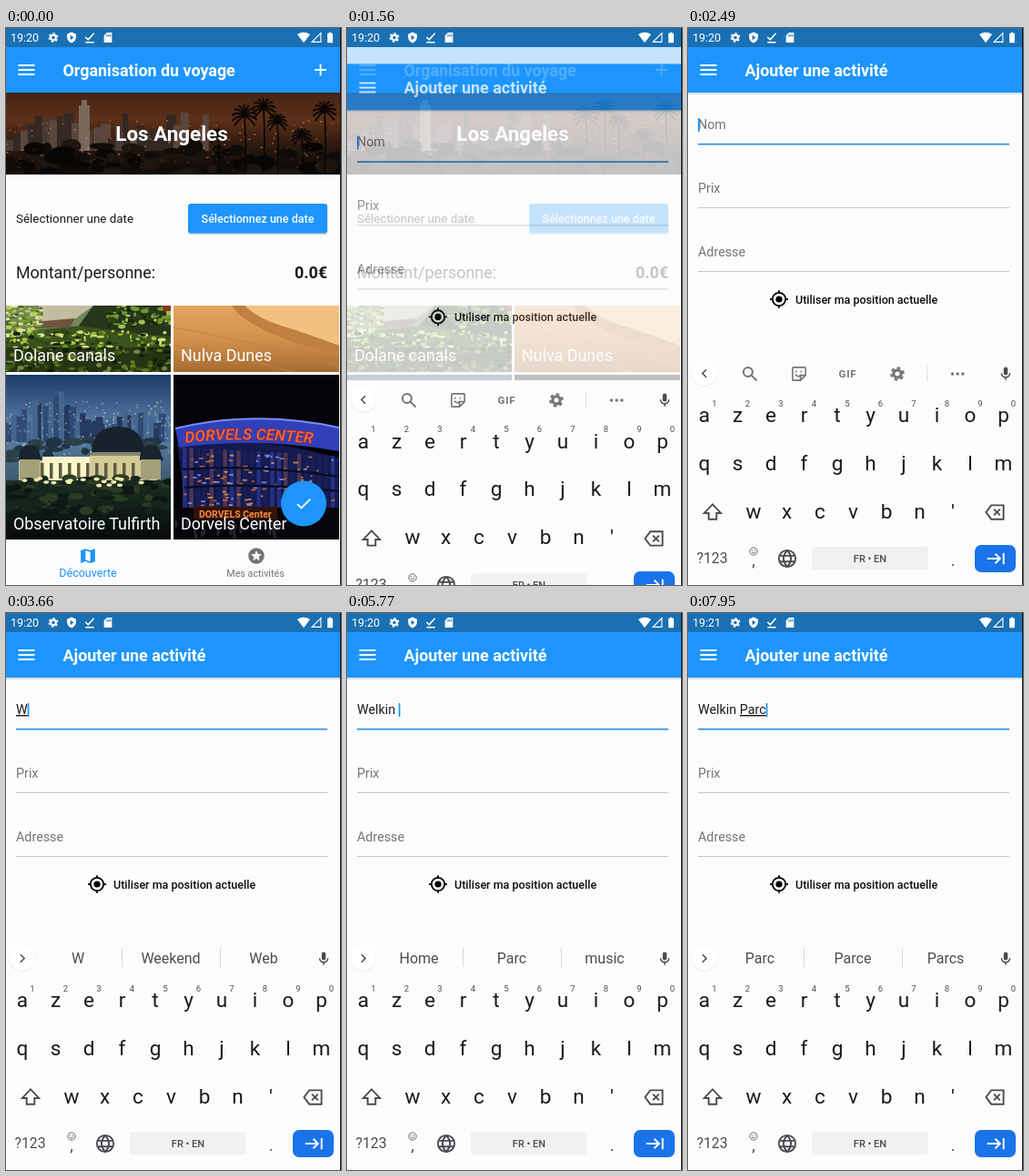
Animation of 368 by 612 pixels, one loop 8 s. Source, as an HTML page:

```html
<!DOCTYPE html>
<html lang="fr">
<head>
<meta charset="utf-8">
<title>Organisation du voyage</title>
<style>
html, body { margin: 0; width: 100%; height: 100%; overflow: hidden; background: #fcfcfe; }
svg { display: block; }
text { font-family: Roboto, "Liberation Sans", sans-serif; white-space: pre; }
</style>
</head>
<body>
<svg id="stage" width="368" height="612" viewBox="0 0 368 612"></svg>
<script>
const BLUE = '#1d95fc', PAGE = '#fcfcfe', INK = '#1a1a1a', GREY = '#747474', KEY = '#4a4d50', RULE = '#c6c6be';

// ---------- drawing helpers ----------
let seed = 7;
const rnd = (a, b) => a + (b - a) * ((seed = seed * 16807 % 2147483647) / 2147483647);
const pick = (...list) => list[rnd(0, list.length) | 0];
const times = (n, fn) => Array.from({ length: n }, (_, i) => fn(i)).join('');
const rect = (x, y, w, h, fill, more = '') =>
  `<rect x="${x}" y="${y}" width="${w}" height="${h}" fill="${fill}" ${more}/>`;
const oval = (x, y, rx, ry, fill, more = '') =>
  `<ellipse cx="${x}" cy="${y}" rx="${rx}" ry="${ry}" fill="${fill}" ${more}/>`;
const path = (d, fill, more = '') => `<path d="${d}" fill="${fill}" fill-rule="evenodd" ${more}/>`;
const line = (d, color, w = 1, more = '') => path(d, 'none', `stroke="${color}" stroke-width="${w}" ${more}`);
const text = (x, y, size, s, fill = INK, more = '') =>
  `<text x="${x}" y="${y}" font-size="${size}" fill="${fill}" ${more}>${s}</text>`;
const MID = ' text-anchor="middle"', MEDIUM = ' font-weight="500"', BOLD = ' font-weight="700"';
const ring = (x, y, r) => `M${x - r} ${y}a${r} ${r} 0 1 0 ${2 * r} 0a${r} ${r} 0 1 0 ${-2 * r} 0`;
const at = (x, y, size, body) =>
  `<g transform="translate(${x - size / 2} ${y - size / 2}) scale(${size / 24})">${body}</g>`;
const solid = (x, y, size, color, d) => at(x, y, size, path(d, color));
const outline = (x, y, size, color, d, w = 2, more = '') => at(x, y, size, line(d, color, w, more));
const gear = (x, y, size, color) => at(x, y, size,
  line(ring(12, 12, 5.3), color, 4) + line(ring(12, 12, 8.4), color, 3, 'stroke-dasharray="4.6 4.2"'));
const fade = (id, ...stops) => `<linearGradient id="${id}" x2="0" y2="1">` +
  stops.map((c, i) => `<stop offset="${i / (stops.length - 1)}" stop-color="${c}"/>`).join('') + '</linearGradient>';
const photo = (x, y, w, h, body) => `<svg x="${x}" y="${y}" width="${w}" height="${h}">${body}</svg>`;

const MENU = 'M3 18h18v-2H3zM3 13h18v-2H3zM3 6v2h18V6z';
const PLUS = 'M19 13h-6v6h-2v-6H5v-2h6V5h2v6h6z';
const CHECK = 'M9 16.2L4.8 12l-1.4 1.4L9 19 21 7l-1.4-1.4z';
const MAP = 'M20.5 3L15 5.1 9 3 3 5v16l6-2.1 6 2.1 6-2V3zM15 19l-6-2.1V5l6 2.1z';
const STAR = ring(12, 12, 10) + 'M16.2 18L12 15.5 7.8 18l1.1-4.8L5.2 10l4.9-.4L12 5l1.9 4.5 4.9.4-3.7 3.3z';
const MIC = 'M12 14q3 0 3-3V5q0-3-3-3T9 5v6q0 3 3 3zM17 11q0 5-5 5t-5-5H5q0 6 6 7v3h2v-3q6-1 6-7z';
const GLOBE = ring(12, 12, 10) + 'M12 2Q3 12 12 22Q21 12 12 2M3 8.5h18M3 15.5h18';
const BACK = 'M15 6l-6 6 6 6', FORTH = 'M9 6l6 6-6 6';

// ---------- photos ----------
function palm(x, y, r, h) {
  const c = '#0b0805';
  return line(`M${x} ${y}q2 ${h / 2} 0 ${h}`, c, 1.8) + times(11, i => {
    const a = i / 10 * 4.4 - 3.8, dx = Math.cos(a) * r, dy = Math.sin(a) * r;
    return line(`M${x} ${y}q${dx * .6} ${dy * .8 - 2} ${dx} ${dy + 3}`, c, 2);
  });
}

function cityPhoto() {
  return rect(0, 0, 367, 90, 'url(#dusk)') +
    times(28, i => {
      const h = rnd(12, 44);
      return rect(i * 8, 64 - h, rnd(6, 13), h, pick('#4a3a36', '#332824', '#5a463c'));
    }) +
    rect(80, 14, 12, 50, '#7a685c') + rect(83, 8, 6, 8, '#7a685c') +
    times(130, () => rect(rnd(0, 360), rnd(30, 72), 1.6, 1.6, pick('#c07a3a', '#8a5a38', '#d8b080'), 'opacity=".6"')) +
    times(80, () => oval(rnd(0, 367), rnd(58, 92), rnd(5, 15), rnd(3, 9), pick('#100c09', '#1c1510', '#090706'))) +
    times(40, () => rect(rnd(0, 360), rnd(60, 86), 1.6, 1.2, '#a0602c', 'opacity=".5"')) +
    palm(262, 25, 14, 65) + palm(283, 17, 13, 72) + palm(298, 32, 11, 60) + palm(350, 20, 13, 70) +
    palm(325, 48, 11, 45) + palm(233, 47, 9, 40);
}

function canalPhoto() {
  const leaves = (n, x0, x1, y0, y1, ...colors) =>
    times(n, () => oval(rnd(x0, x1), rnd(y0, y1), rnd(1, 4.5), rnd(.8, 2.6), pick(...colors)));
  return rect(0, 0, 181, 73, '#3c5220') +
    path('M0 0H110L84 22 0 30z', '#74865c') + path('M36 0H96L74 16 40 20z', '#c3bda0') +
    path('M30 18L76 14 70 24 26 25z', '#6e5440') +
    path('M96 0H181V34Q130 30 80 22z', '#26361a') +
    leaves(110, 0, 40, 0, 34, '#b4cc5a', '#456a20', '#dde6a0', '#7ca034') +
    leaves(80, 112, 181, 0, 24, '#2a4414', '#6f9430', '#19290c', '#a3bd58') +
    leaves(280, 0, 181, 28, 74, '#a8c43e', '#2c4612', '#d3de7c', '#6a9024', '#16260a') +
    rect(172, 0, 9, 6, '#8c3422') + rect(0, 46, 181, 27, '#0c1606', 'opacity=".45"');
}

function dunePhoto() {
  return rect(0, 0, 182, 73, 'url(#sand)') +
    path('M78 0Q92 14 118 22T182 44V0z', '#f2c182') +
    path('M78 0Q92 14 118 22T182 44V54Q130 42 100 27T64 0z', '#bf8040') +
    line('M0 24Q70 36 182 66M0 44Q60 52 130 73', '#c08244', 2, 'opacity=".5"');
}

function domePhoto() {
  return rect(0, 0, 181, 181, 'url(#mist)') +
    times(32, i => {
      const h = rnd(6, i > 2 && i < 14 ? 44 : 20);
      return rect(i * 5.8, 60 - h, rnd(4, 9), h + 14, pick('#2f4a74', '#45658f', '#243a5e'));
    }) +
    times(200, () => rect(rnd(0, 181), rnd(28, 88), 1.5, 1.5, pick('#e8dca0', '#9fc0e0', '#c8b878'), 'opacity=".65"')) +
    times(45, () => oval(rnd(0, 181), rnd(72, 94), rnd(4, 12), rnd(2, 6), pick('#203444', '#2b4048'))) +
    rect(14, 94, 152, 23, '#c9c188') + rect(40, 90, 54, 26, '#fbf5cc') + rect(92, 84, 62, 32, '#d2cb98') +
    times(15, i => rect(18 + i * 10, 97, 3.5, 17, '#5f5c40')) +
    path('M94 86Q95 57 123 57T152 86z', '#18222c') + rect(92, 85, 62, 4, '#86886c') +
    path('M14 94Q14 77 26 77T38 94zM147 94Q147 77 159 77T171 94z', '#18242e') +
    rect(15, 93, 22, 22, '#a5a078') + rect(148, 93, 22, 22, '#a5a078') +
    rect(0, 116, 181, 65, 'url(#hill)') +
    times(90, () => oval(rnd(0, 181), rnd(113, 150), rnd(3, 10), rnd(2, 5), pick('#16261c', '#2a3c24', '#0d1814'))) +
    times(18, () => oval(rnd(20, 165), rnd(113, 122), 3, 1.8, '#f6ebae'));
}

function arenaPhoto() {
  return rect(0, 0, 182, 181, '#030308') +
    path('M4 76Q90 64 182 92V150H14z', '#141a4e') +
    times(24, i => rect(10 + i * 7.4, 80 + i * .4, 4.4, 66, pick('#2a3690', '#5a3c5c', '#1a2058'), 'opacity=".8"')) +
    times(110, () => rect(rnd(10, 175), rnd(86, 146), rnd(2, 6), 1.8, pick('#f0a048', '#d86c30', '#8c9cf0'), 'opacity=".8"')) +
    line('M10 104Q90 98 182 112M12 124Q90 118 182 128', '#0a0d28', 2.5) +
    path('M2 59Q90 38 182 58V84Q90 68 6 80z', '#3040b8') + line('M2 59Q90 38 182 58', '#7a8cf4', 2) +
    '<path id="arc" d="M13 75Q90 66 178 79" fill="none"/>' +
    `<text font-size="17.4" fill="#ff6a30" stroke="#b01c1c" stroke-width=".5" font-style="italic" ${BOLD}>` +
    '<textPath href="#arc">DORVELS CENTER</textPath></text>' +
    rect(0, 146, 182, 35, '#06060a') + rect(22, 145, 92, 14, '#30140c') +
    text(28, 156.5, 10.5, 'DORVELS Center', '#ff8a3a', BOLD) +
    times(22, () => oval(rnd(0, 120), rnd(162, 178), 1.5, 4, '#2a2230'));
}

// ---------- screens ----------
const appBar = title => rect(0, 71, 368, 2, '#dfe3e4') + rect(0, 20, 368, 51, BLUE) +
  solid(22.5, 46, 24, '#fff', MENU) + text(62.5, 53, 17.9, title, '#fff', BOLD);

const statusBar = rect(0, 0, 368, 21, '#1a70b2') +
  text(5, 15, 12.5, '19:20', '#fff', 'id="clock"') + gear(52, 10.5, 13, '#fff') +
  solid(72, 10.5, 13, '#fff', 'M12 1L3 5v6c0 6 4 10 9 12 5-2 9-6 9-12V5zM9.5 7l7 5-7 5z') +
  outline(92, 10.5, 14, '#fff', 'M4 11l5 5L20 4M4 21h16', 2.6) +
  solid(112, 10.5, 13, '#fff', 'M10 2h10v20H4V8zM9 6v4h2V6zM12.5 6v4h2V6zM16 6v4h2V6z') +
  solid(327, 10.5, 14, '#fff', 'M12 22L0 6Q12-2 24 6z') +
  outline(341, 10.5, 13, '#fff', 'M3 21L21 3V21z') +
  solid(356, 10.5, 14, '#fff', 'M10 2h4v2h3v18H7V4h3z');

const listScreen = rect(0, 0, 368, 612, PAGE) + appBar('Organisation du voyage') +
  solid(345.5, 46, 22, '#fff', PLUS) +
  photo(0, 71, 367, 90, cityPhoto()) + text(182, 124, 22.4, 'Los Angeles', '#fff', BOLD + MID) +
  text(11, 214, 13.42, 'Sélectionner une date') +
  rect(200, 195, 153, 32, '#cfd2d4', 'rx="3"') + rect(200, 193, 153, 32.5, BLUE, 'rx="3"') +
  text(276.5, 214, 12.53, 'Sélectionnez une date', '#fff', MEDIUM + MID) +
  text(11, 275, 17.9, 'Montant/personne:') + text(353, 275, 17.9, '0.0€', INK, BOLD + ' text-anchor="end"') +
  photo(0, 305, 181, 73, canalPhoto()) + photo(184, 305, 182, 73, dunePhoto()) +
  photo(0, 381, 181, 181, domePhoto()) + photo(184, 381, 182, 181, arenaPhoto()) +
  text(8, 366, 17.9, 'Dolane canals', '#fff') + text(192, 366, 17.9, 'Nulva Dunes', '#fff') +
  text(8, 551, 17.9, 'Observatoire Tulfirth', '#fff') + text(192, 551, 17.9, 'Dorvels Center', '#fff') +
  oval(327, 525, 25, 25, '#000', 'opacity=".35"') + oval(327, 522.5, 25, 25, BLUE) +
  solid(327, 522.5, 21, '#fff', CHECK) +
  solid(90, 580, 21, BLUE, MAP) + text(90, 602.5, 12.53, 'Découverte', BLUE, MID) +
  solid(275, 580, 21, GREY, STAR) + text(274, 602.5, 10.74, 'Mes activités', GREY, MID);

const formScreen = rect(0, 0, 368, 612, PAGE) + appBar('Ajouter une activité') +
  text(11, 111, 14.32, 'Nom', GREY, 'id="hint"') + text(11, 111, 14.32, '', INK, 'id="field"') +
  rect(11, 99, 1.7, 15, BLUE, 'id="cursor"') + rect(11, 126.8, 342, 1.7, '#2b93e4') +
  text(11, 181, 14.32, 'Prix', GREY) + rect(11, 197, 342, 1, RULE) +
  text(11, 251, 14.32, 'Adresse', GREY) + rect(11, 267, 342, 1, RULE) +
  outline(100, 298, 21.5, '#000', ring(12, 12, 8) + 'M12 1v3M12 20v3M1 12h3M20 12h3') + oval(100, 298, 3.6, 3.6, '#000') +
  text(118, 303, 12.53, 'Utiliser ma position actuelle', '#0c0c0c', MEDIUM);

const keyRow = (letters, x, y) => [...letters].map((c, i) => text(x + i * 36.5, y, 22.6, c, INK, MID)).join('');
const keyboard = rect(0, 358, 368, 254, PAGE) +
  oval(18, 380, 14, 14, '#ececea') + oval(18, 379, 13.7, 13.7, '#fff') +
  outline(18, 379.5, 17, KEY, BACK, 2.2, 'id="chevron"') +
  '<g id="tools">' +
  outline(68, 380, 20, GREY, ring(9.5, 9.5, 6) + 'M14 14l7 7', 2.4) +
  outline(122, 380, 19, GREY, 'M4 3H20Q21 3 21 4V14L14 21H4Q3 21 3 20V4Q3 3 4 3M21 14H14V21M7 13Q11 18 15 13M8 8v2M15 8v2') +
  text(175.5, 384, 11.5, 'GIF', GREY, BOLD + MID + ' letter-spacing=".8"') + gear(230, 380, 19, GREY) +
  rect(262, 370, 1, 19, '#dededa') + times(3, i => oval(290.5 + i * 5.7, 380, 1.7, 1.7, GREY)) + '</g>' +
  '<g id="words">' + times(3, i => text(79 + i * 102, 385, 16, '', KEY, MID)) +
  rect(127, 368, 1, 21, '#d8d8d6') + rect(235, 368, 1, 21, '#d8d8d6') + '</g>' +
  solid(349, 380, 18, KEY, MIC) +
  keyRow('azertyuiop', 18, 433) + keyRow('qsdfghjklm', 18, 485.5) + keyRow("wxcvbn'", 72, 538.5) +
  times(10, i => text(29 + i * 36.5, 415.5, 9.5, (i + 1) % 10, KEY, MID)) +
  outline(27, 532, 23, KEY, 'M12 3L2.5 13H7.5V20H16.5V13H21.5z') +
  outline(337, 532, 23, KEY, 'M8 4H22V20H8L2 12zM11 8.5l7 7M18 8.5l-7 7') +
  text(26.5, 588, 15.8, '?123', KEY, MID) +
  outline(72, 575, 10, KEY, ring(12, 12, 10) + 'M7 14Q12 20 17 14M8 8v3M16 8v3') + text(72, 591, 18, ',', KEY, MID) +
  outline(109, 583, 22, KEY, GLOBE) +
  rect(136, 570, 127.5, 25.5, '#f0f2f0', 'rx="3"') + text(200, 587, 11, 'FR • EN', KEY, MEDIUM + MID) +
  text(291, 591, 18, '.', KEY, MID) +
  rect(315, 568, 45, 30, '#1a73e8', 'rx="7"') + outline(337.5, 583, 21, '#fff', 'M2 12H18M12 6l6 6-6 6M22.5 5v14', 2.2);

document.getElementById('stage').innerHTML = '<defs>' +
  fade('dusk', '#452316', '#5c3018', '#2a180f', '#0a0807') + fade('sand', '#e3a65e', '#d2924c', '#a86a32') +
  fade('mist', '#1c3a68', '#5c82ae', '#3a566c', '#101c20') + fade('hill', '#1e3022', '#101c18', '#060b0c') + '</defs>' +
  `<g>${listScreen}</g><g id="form">${formScreen}</g><g id="keys">${keyboard}</g>` +
  statusBar + rect(367, 0, 1, 612, '#161616');

// ---------- motion ----------
// time of key press, character, suggestions after it
const presses = [
  [3430, 'W', 'W Weekend Web'], [4290, 'e', 'We Weekend Web'], [4520, 'l', 'Wel Welcome Well'],
  [4840, 'k', 'Welk Welcome Week'], [5140, 'i', 'Welki Welcome Week'], [5380, 'n', 'Welkin Welcome Welkins'],
  [5690, ' ', 'Home Parc music'], [6000, 'P', 'P Pas Par'], [6940, 'a', 'Pa Pas Par'],
  [7250, 'r', 'Par Part Parc'], [7640, 'c', 'Parc Parce Parcs']
];
const el = Object.fromEntries([...document.querySelectorAll('[id]')].map(e => [e.id, e]));
const wordSlots = el.words.querySelectorAll('text');
const clamp = v => Math.min(1, Math.max(0, v));
const show = (e, on) => e.setAttribute('display', on ? 'inline' : 'none');

function draw(t) {
  const page = 1 - (1 - clamp((t - 1490) / 140)) ** 2;
  const rise = 1 - (1 - clamp((t - 1480) / 230)) ** 5;
  el.form.setAttribute('opacity', page);
  el.form.setAttribute('transform', `translate(0 ${(1 - page) * 80})`);
  el.keys.setAttribute('transform', `translate(0 ${(1 - rise) * 254})`);
  show(el.form, page > 0);
  show(el.keys, rise > 0);

  const done = presses.filter(p => p[0] <= t), last = done[done.length - 1];
  const typed = done.map(p => p[1]).join('');
  el.field.innerHTML = typed.replace(/\S+$/, '<tspan text-decoration="underline">$&</tspan>');
  show(el.hint, !typed);
  show(el.tools, !typed);
  show(el.words, typed);
  el.chevron.setAttribute('d', typed ? FORTH : BACK);
  if (last) last[2].split(' ').forEach((w, i) => wordSlots[i].textContent = w);

  const blinkStart = last ? last[0] : 1400;
  el.cursor.setAttribute('x', 11 + (typed ? el.field.getComputedTextLength() : 0));
  el.cursor.setAttribute('opacity', Math.floor((t - blinkStart) / 500) % 2 ? 0 : 1);
  el.clock.textContent = t < 7250 ? '19:20' : '19:21';
}

(function tick() {
  draw(performance.now() % 8000);
  requestAnimationFrame(tick);
})();
</script>
</body>
</html>
```
